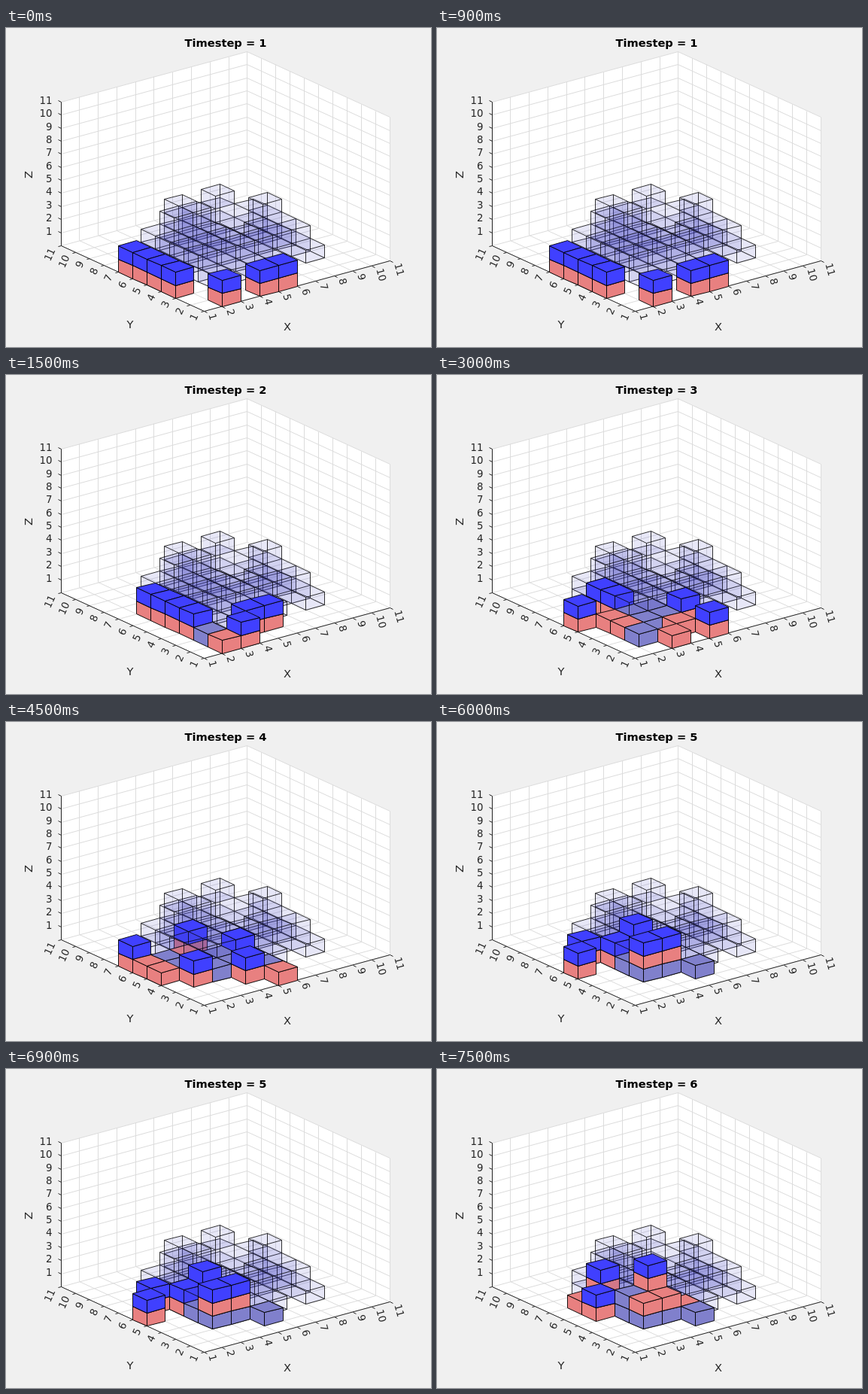
An HTML page with a canvas that plays this animation: 565x424 px, repeating every 8000 ms.

```html
<!DOCTYPE html>
<html lang="en">
<head>
<meta charset="utf-8">
<title>Block building</title>
<style>
html, body { margin: 0; width: 100%; height: 100%; overflow: hidden; background: #f0f0f0; }
canvas { display: block; }
</style>
</head>
<body>
<canvas id="stage" width="565" height="424"></canvas>
<script>
const ctx = document.getElementById('stage').getContext('2d');
const FONT = '"DejaVu Sans", sans-serif';
const INK = '#262626', GRID = '#dcdcdc';
const STEP = 1500, LOOP = 8000;
const COLORS = { r: '#e88080', b: '#4040ff', p: '#8080cc' };

// Target heights: rows from y = 8 down to y = 3, columns x = 3 to 8.
const TARGET = ['003230', '233112', '222113', '222122', '222222', '111101'];

// Each entry: x, y, then the stack from the floor up
// (r = robot, b = carried block, p = placed block).
const SCENES = [
  '13rb 14rb 15rb 16rb 21rb 41rb 51rb',
  '23rb 24rb 25rb 26rb 22p 21r 31rb 42rb 52rb',
  '15rb 23r 24r 35rb 36rb 34p 33p 44p 43p 22p 31r 42r 53rb 51rb',
  '16rb 15r 14r 23rb 25p 35r 46rb 34p 33p 44p 43p 54rb 42rb 52p 51r',
  '15rb 26rb 35rb 34p 45prb 44pp 33prb 43prb 52p',
  '26r 25rb 36prb 35p 34pp 44pprb 33pr 43pr 53r 52p'
].map(s => s.split(' '));

// Orthographic projection of data coordinates, snapped to pixel centres.
function project(x, y, z) {
  const px = 263.6 + 24.77 * (x - 1) - 19.01 * (y - 1);
  const py = 377.4 - 6.71 * (x - 1) - 8.75 * (y - 1) - 17.36 * z;
  return [Math.floor(px - 0.4) + 0.5, Math.floor(py - 0.5) + 0.5];
}

function path(points, closed) {
  ctx.beginPath();
  points.forEach(p => ctx.lineTo(...project(...p)));
  if (closed) ctx.closePath();
}

function line(color, ...points) {
  path(points);
  ctx.strokeStyle = color;
  ctx.stroke();
}

function label(str, x, y, { size = 13.33, angle = 0, align = 'center', color = INK, weight = '' } = {}) {
  ctx.save();
  ctx.translate(x, y);
  ctx.rotate(angle * Math.PI / 180);
  ctx.font = `${weight} ${size}px ${FONT}`;
  ctx.textAlign = align;
  ctx.fillStyle = color;
  ctx.fillText(str, 0, Math.round(size * 0.365));
  ctx.restore();
}

function tick([x, y], dx, dy) {
  ctx.beginPath();
  ctx.moveTo(x, y);
  ctx.lineTo(x + dx, y + dy);
  ctx.strokeStyle = INK;
  ctx.stroke();
}

function drawAxes() {
  ctx.lineWidth = 1;
  ctx.fillStyle = '#f0f0f0';
  ctx.fillRect(0, 0, 565, 424);
  path([[1, 1, 0], [11, 1, 0], [11, 1, 11], [11, 11, 11], [1, 11, 11], [1, 11, 0]], true);
  ctx.fillStyle = '#fff';
  ctx.fill();

  for (let i = 1; i <= 11; i++) {
    line(GRID, [i, 1, 0], [i, 11, 0], [i, 11, 11]);
    line(GRID, [1, i, 0], [11, i, 0], [11, i, 11]);
    line(GRID, [1, 11, i], [11, 11, i], [11, 1, i]);
  }
  line(INK, [11, 1, 0], [1, 1, 0], [1, 11, 0], [1, 11, 11]);

  for (let i = 1; i <= 11; i++) {
    const px = project(i, 1, 0), py = project(1, i, 0), pz = project(1, 11, i);
    tick(px, 4, 2);
    tick(py, -4, 1);
    tick(pz, -4, -2);
    label(i, px[0] + 10.6, px[1] + 3.2, { angle: 74.8, align: 'left' });
    label(i, py[0] - 12.2, py[1] + 3.8, { angle: -65.3, align: 'right' });
    label(i, 61.5, pz[1] - 2.5, { align: 'right' });
  }
  label('X', 374, 397, { size: 14.67 });
  label('Y', 165, 394, { size: 14.67 });
  label('Z', 30, 195, { size: 14.67, angle: -90 });
}

function face(points, fill) {
  path(points, true);
  ctx.fillStyle = fill;
  ctx.fill();
  ctx.strokeStyle = '#000';
  ctx.stroke();
}

function solid({ x, y, z, color }) {
  const X = x + 1, Y = y + 1, Z = z + 1;
  face([[x, y, z], [x, Y, z], [x, Y, Z], [x, y, Z]], color);
  face([[x, y, z], [X, y, z], [X, y, Z], [x, y, Z]], color);
  face([[x, y, Z], [X, y, Z], [X, Y, Z], [x, Y, Z]], color);
}

// A see-through cube; edges shared with neighbours are drawn only once.
function ghost({ x, y, z }, drawn) {
  const X = x + 1, Y = y + 1, Z = z + 1;
  path([[x, y, z], [X, y, z], [X, y, Z], [X, Y, Z], [x, Y, Z], [x, Y, z]], true);
  ctx.fillStyle = 'rgba(64,64,190,0.125)';
  ctx.fill();
  const edge = (a, b) => {
    const key = a + '|' + b;
    if (drawn.has(key)) return;
    drawn.add(key);
    line('#000', a, b);
  };
  for (const i of [0, 1]) {
    for (const j of [0, 1]) {
      edge([x, y + i, z + j], [X, y + i, z + j]);
      edge([x + i, y, z + j], [x + i, Y, z + j]);
      edge([x + i, y + j, z], [x + i, y + j, Z]);
    }
  }
}

const ghosts = [];
TARGET.forEach((row, r) => [...row].forEach((h, c) => {
  for (let z = 0; z < h; z++) ghosts.push({ x: c + 3, y: 8 - r, z });
}));

// Far cubes first, lower cubes before higher ones.
const scenes = SCENES.map(cells => {
  const solids = cells.flatMap(([x, y, ...stack]) =>
    stack.map((kind, z) => ({ x: +x, y: +y, z, color: COLORS[kind] })));
  return [...ghosts, ...solids].sort((a, b) => b.x - a.x || b.y - a.y || a.z - b.z);
});

function drawScene(step) {
  drawAxes();
  ctx.lineJoin = 'round';
  const drawn = new Set();
  for (const cube of scenes[step]) {
    ctx.lineWidth = cube.color ? 0.9 : 0.8;
    if (cube.color) solid(cube);
    else ghost(cube, drawn);
  }
  label(`Timestep = ${step + 1}`, 292, 20, { size: 14.67, color: '#000', weight: 'bold' });
}

const start = performance.now();
let shown = -1;
function frame() {
  const step = Math.floor(((performance.now() - start) % LOOP) / STEP);
  if (step !== shown) drawScene(shown = step);
  requestAnimationFrame(frame);
}
frame();
</script>
</body>
</html>
```
